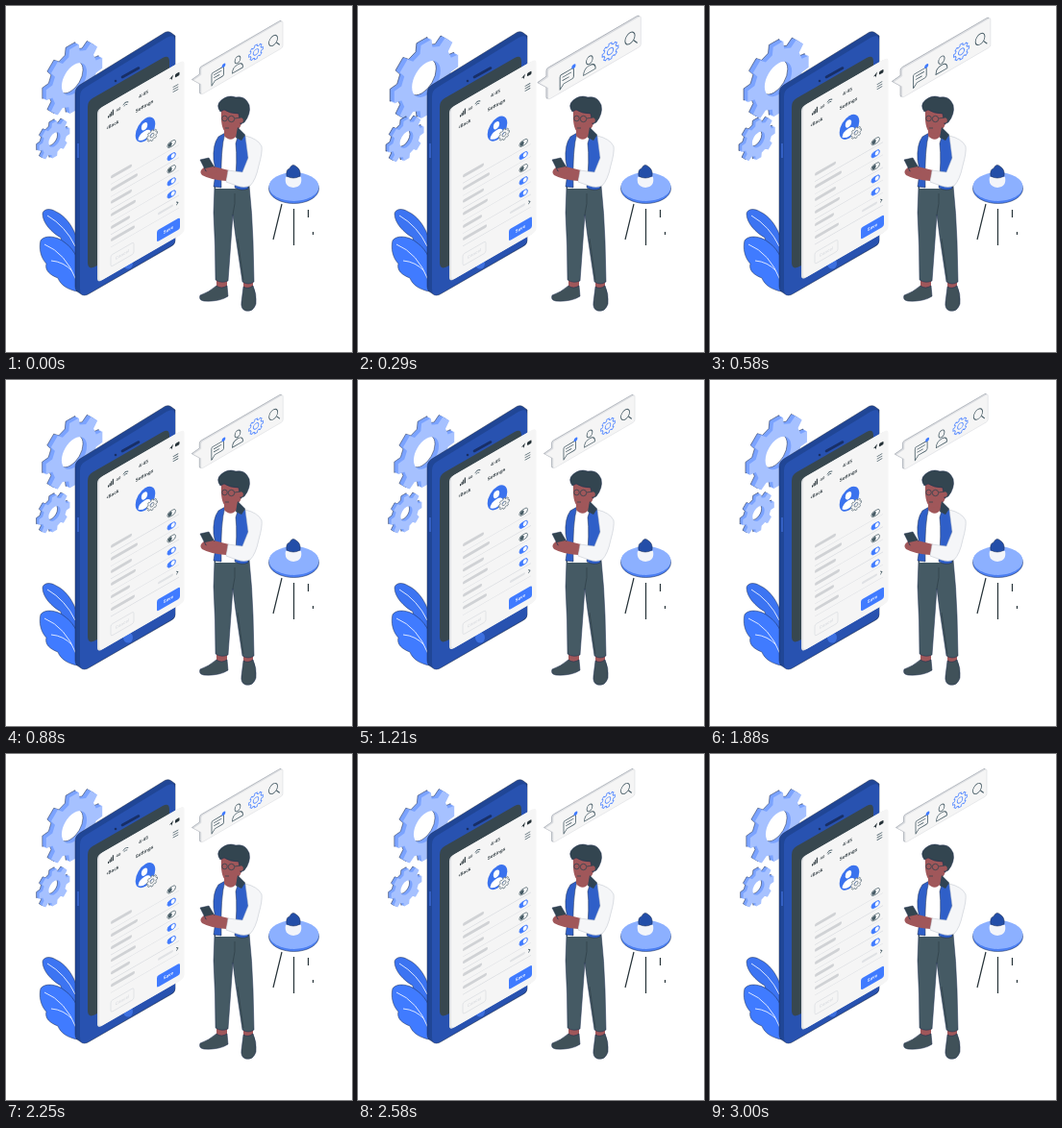
Animation, 360 px wide and 360 px high, one loop 3.04 s. Source, as an HTML page:

```html
<!DOCTYPE html>
<html lang="en">
<head>
<meta charset="utf-8">
<title>Phone settings</title>
<style>
html, body { margin: 0; width: 100%; height: 100%; overflow: hidden; background: #fff; }
svg { display: block; width: 360px; height: 360px; }
text { font-family: Inter, Arial, sans-serif; font-weight: 600; text-anchor: middle; }
.edge { stroke: #1b2a4d; stroke-width: .5; stroke-linejoin: round; }
.line { fill: none; stroke: #455a64; stroke-width: .8; stroke-linecap: round; stroke-linejoin: round; }
</style>
</head>
<body>
<svg viewBox="0 0 360 360">
  <g id="gears"></g>

  <g id="leaves">
    <path class="edge" fill="#3c74f2" d="M38 216C39 211 46 210 52 214C61 218 69 228 73 240V265C62 258 58 250 57 241C48 236 38 226 38 216Z"/>
    <path class="edge" fill="#407bff" d="M36 244C40 238 53 239 61 246C67 250 71 256 74 262V297C65 295 57 291 54 283C46 280 40 275 42 268C36 262 34 252 36 244Z"/>
    <path fill="none" stroke="#dbe6ff" stroke-width="1" d="M43 218Q62 229 72 250M40 248Q62 257 73 285M47 265Q60 266 69 276"/>
  </g>

  <g id="phone">
    <path class="edge" fill="#204696" d="M72 91Q72 85 77 82L163 29Q168 25 172 28L176 31V244Q176 248 172 250L87 299Q81 303 77 299L74 297Q72 295 72 292Z"/>
    <path fill="#2852b0" d="M77 94Q77 88 82 85L167 33Q176 28 176 37V242Q176 247 172 249L86 299Q77 304 77 294Z"/>
    <path fill="#37474f" d="M85 105Q85 99 90 96L163 54Q170 50 170 58V223L95 270Q85 276 85 267Z"/>
    <path stroke="#182f66" stroke-width="2.600" stroke-linecap="round" d="M121 74L138 64.500"/>
    <circle cx="114" cy="78" r="1.300" fill="#182f66"/>
    <ellipse cx="127" cy="268" rx="5" ry="5.500" fill="#3d70e0"/>
    <path stroke="#3a68d2" stroke-width="1.500" d="M75 143V158"/>
  </g>

  <g id="panel"></g>
  <g id="bubble"></g>

  <g id="table">
    <path fill="none" stroke="#263238" stroke-width="1.200" d="M287 206L278 243M299.500 211V249M314.500 212V220M319.500 235V238"/>
    <ellipse class="edge" cx="299.500" cy="190" rx="26" ry="15.500" fill="#4c7ff2"/>
    <ellipse cx="299.500" cy="188" rx="26" ry="15" fill="#8cb0ff"/>
    <path fill="#f3f5fa" d="M291 178H307Q309 188 299 189Q289 188 291 178Z"/>
    <path class="edge" fill="#234ea8" d="M292 177Q291 170 295 169Q298 163 302 167Q307 170 306 177Q299 181 292 177Z"/>
  </g>

  <g id="man">
    <path fill="#a0575a" d="M219 282H230V296H219ZM247 283H257V297H247Z"/>
    <path class="edge" fill="#405159" d="M219 291Q224 295 230 291L231 302Q222 308 206 307Q200 306 202 301Q211 298 219 291Z"/>
    <path class="edge" fill="#405159" d="M247 292Q252 295 257 291Q261 300 260 310Q257 319 249 317Q244 315 245 308Z"/>
    <path class="edge" fill="#455a64" d="M217 187H253Q256 215 257 245L258 287Q252 291 246 287L239 240L236 217L231 286Q224 289 218 285Q218 250 216 215Z"/>
    <path fill="none" stroke="#34464f" stroke-width="1" d="M236 217Q239 205 238 195M241 242L247 285"/>
    <path fill="#fff" d="M221 138L232 132L249 135L252 190H218Z"/>
    <path class="edge" fill="#2f5fc8" d="M221 136L228 132Q223 148 224 189L216 188Q219 172 216 160Q215 144 221 136Z"/>
    <path class="edge" fill="#2f5fc8" d="M242 133L249 135Q254 142 252 160L252 190Q245 193 238 189Q241 160 239 143Z"/>
    <path fill="#a0575a" d="M227 126H241V134Q234 143 227 135Z"/>
    <path fill="#a0575a" d="M224 108Q235 101 246 110Q247 124 241 129Q235 135 228 131Q223 126 224 108Z"/>
    <path fill="#2f4354" d="M241 126L249 134L245 140L239 137Z"/>
    <path class="edge" fill="#334550" d="M223 110Q218 103 224 98Q231 92 239 95Q249 93 253 103Q255 112 248 121L244 123L242 112Q233 112 227 108Z"/>
    <circle cx="244" cy="119" r="2.800" fill="#a0575a"/>
    <g fill="none" stroke="#334550" stroke-width=".8">
      <circle cx="227.500" cy="117" r="2.800"/><circle cx="234.500" cy="117.500" r="3.200"/>
      <path d="M238 117L244 116M228 127L232 127"/>
    </g>
    <path fill="#a0575a" d="M206 168Q210 164 216 167L232 171L229 182Q213 181 204 176Q200 172 206 168Z"/>
    <path fill="#f5f6f8" stroke="#b9bfc9" stroke-width=".5" d="M249 135Q262 138 266 146Q267 152 263 166Q260 181 254 187Q248 190 240 187L229 183L231 171L246 173L252 158Z"/>
    <path class="edge" fill="#334550" d="M202 160L211 158L217 168L208 172Z"/>
    <path fill="#a0575a" d="M207 169L216 167L220 173L211 176Z"/>
  </g>
</svg>
<script>
const LOOP = 3040;
const $ = id => document.getElementById(id);

function gearPath(r, hole, teeth = 8) {
  const pts = [];
  const step = 2 * Math.PI / teeth;
  for (let i = 0; i < teeth; i++) {
    for (const [at, k] of [[-.31, .79], [-.21, 1], [.21, 1], [.31, .79]]) {
      const a = (i + at) * step;
      pts.push((Math.cos(a) * r * k).toFixed(2) + ' ' + (Math.sin(a) * r * k).toFixed(2));
    }
  }
  return `M${pts.join('L')}ZM${hole} 0A${hole} ${hole} 0 1 0 ${-hole} 0A${hole} ${hole} 0 1 0 ${hole} 0Z`;
}

function solidGear(x, y, r, hole, depth) {
  const d = gearPath(r, hole);
  const face = (dx, dy, fill, cls) =>
    `<path class="${cls}" fill="${fill}" fill-rule="evenodd" transform="matrix(.87 -.5 0 1 ${x + dx} ${y + dy})" d="${d}"/>`;
  let out = '';
  for (let i = depth; i > 0; i--) out += face(-i, -i * .5, '#7ba3ff', i === depth ? 'edge' : '');
  return `<g class="pulse" data-x="${x}" data-y="${y}">${out}${face(0, 0, '#a6c1ff', '')}</g>`;
}

const bar = (x, y, w, h, fill, r = 0, more = '') =>
  `<rect x="${x}" y="${y}" width="${w}" height="${h}" rx="${r}" fill="${fill}" ${more}/>`;
const label = (x, y, size, str, fill = '#263238') =>
  `<text x="${x}" y="${y}" font-size="${size}" fill="${fill}">${str}</text>`;

function toggle(y, on) {
  const ink = on ? '#407bff' : '#455a64';
  return bar(71, y - 2.7, 8.4, 5.4, on ? ink : '#fff', 2.7, `stroke="${ink}" stroke-width=".7"`) +
    `<ellipse cx="${on ? 76.7 : 73.7}" cy="${y}" rx="2" ry="2.2" fill="${on ? '#fff' : ink}"/>`;
}

function panelArt() {
  let s = bar(-2, 0, 88, 180, '#dfe1e4', 4) + bar(0, 0, 88.5, 180, '#f5f5f5', 4);
  for (let i = 0; i < 4; i++) s += bar(9 + i * 1.6, 13 - i * 1.3, 1.1, 2 + i * 1.3, '#263238');
  s += label(20, 13.5, 3.6, '4G') + label(46, 13, 4.5, '4:45');
  s += '<path class="line" d="M25 10.500Q27.500 8 30 10.500M26 12.300Q27.500 11 29 12.300"/>';
  s += '<path fill="#263238" d="M73 11.500L77 9L75.500 14L75 12Z"/>' + bar(79, 9.8, 4.5, 3.4, '#263238', 1);
  s += label(47, 26, 4.7, 'Settings') + label(14, 26.3, 4.6, '‹Back');
  s += '<path class="line" d="M77 22H82M77 24.500H82M77 27H82"/>';
  s += '<ellipse cx="48" cy="49.500" rx="10.300" ry="11.600" fill="#3a72ee"/>' +
    '<ellipse cx="47" cy="45.500" rx="3.200" ry="3.800" fill="#fff"/>' +
    '<path fill="#fff" d="M40.500 56Q41 50.500 47 50.500Q53 50.500 54 56Q47 62 40.500 56Z"/>';
  s += `<path transform="translate(55 59.500)" fill="#f5f5f5" stroke="#6a7a84" stroke-width=".7" fill-rule="evenodd" d="${gearPath(5.6, 2)}"/>`;
  const widths = [22, 28, 22, 26, 20, 25];
  const states = [false, true, false, true, true];
  widths.forEach((w, i) => {
    const y = 80 + i * 13.1;
    s += bar(12, y - 3.2, w, 3.2, '#d0d2d5', 1.6);
    s += bar(12, y + 5.2, 71, .6, '#dadce0');
    if (i < 5) s += toggle(y, states[i]);
  });
  s += bar(61, 143.5, 16, 2.4, '#dfe1e4', 1.2) + '<path class="line" d="M80.500 143.500L82 145L80.500 146.500"/>';
  s += bar(60, 161.5, 24, 12, '#407bff', 2) + label(72, 169, 4.4, 'Save', '#fff');
  s += bar(12, 159.5, 24, 12, 'none', 2, 'stroke="#dcdfe3" stroke-width=".7"') + label(24, 167, 4.3, 'Cancel', '#d9dce0');
  return `<g transform="matrix(1 -.577 0 1 97 107)">${s}</g>`;
}

function bubbleArt() {
  const shape = 'M2 0H83Q85 0 85 2V26Q85 28 83 28H2Q0 28 0 26V17L-8 8L0 7V2Q0 0 2 0Z';
  return `<g class="pulse" data-x="242" data-y="54"><g transform="matrix(1 -.58 0 1 203 64.500)">
    <path fill="#dfe1e4" stroke="#8d949e" stroke-width=".5" transform="translate(-1.500 -1.500)" d="${shape}"/>
    <path fill="#f5f5f5" stroke="#d0d3d8" stroke-width=".4" d="${shape}"/>
    <path class="line" d="M12 12H22Q23.500 12 23.500 13.500V20Q23.500 21.500 22 21.500H14.500L11 25V13.500Q11 12 12 12ZM13.500 15H21M13.500 18H19"/>
    <circle cx="23.500" cy="11" r="1.900" fill="#407bff"/>
    <ellipse class="line" cx="38" cy="13.500" rx="2.900" ry="3.500"/>
    <path class="line" d="M32.500 24.500Q32.500 18.500 38 18.500Q43.500 18.500 43.500 24.500Z"/>
    <path transform="translate(57 16.500)" fill="none" stroke="#5b8dff" stroke-width=".9" d="${gearPath(7.4, 2.8)}"/>
    <ellipse class="line" cx="75" cy="15" rx="4.500" ry="5"/>
    <path class="line" d="M78.500 19L81.500 23"/>
  </g></g>`;
}

$('gears').innerHTML = solidGear(71, 76, 34, 15, 4) + solidGear(50.5, 139, 18.5, 7, 3);
$('panel').innerHTML = panelArt();
$('bubble').innerHTML = bubbleArt();

// time in ms, scale
const beat = [[0, 1], [380, 1.18], [580, 1.085], [900, 1], [1210, 1],
  [1430, 1.17], [1580, 1.095], [1670, 1.073], [2000, 1], [LOOP, 1]];

function scaleAt(t) {
  const i = beat.findIndex(k => k[0] > t);
  const [t0, a] = beat[i - 1], [t1, b] = beat[i];
  return a + (b - a) * (t - t0) / (t1 - t0);
}

const pulsing = [...document.querySelectorAll('.pulse')];
const start = performance.now();

function draw(now) {
  const t = Math.max(0, now - start) % LOOP;
  const k = scaleAt(t);
  for (const el of pulsing) {
    const { x, y } = el.dataset;
    el.setAttribute('transform', `translate(${x} ${y}) scale(${k}) translate(${-x} ${-y})`);
  }
  const lift = 3.3 * (1 + Math.cos(2 * Math.PI * (t - 1390) / LOOP));
  $('panel').setAttribute('transform', `translate(0 ${-lift})`);
  requestAnimationFrame(draw);
}
draw(start);
</script>
</body>
</html>
```
